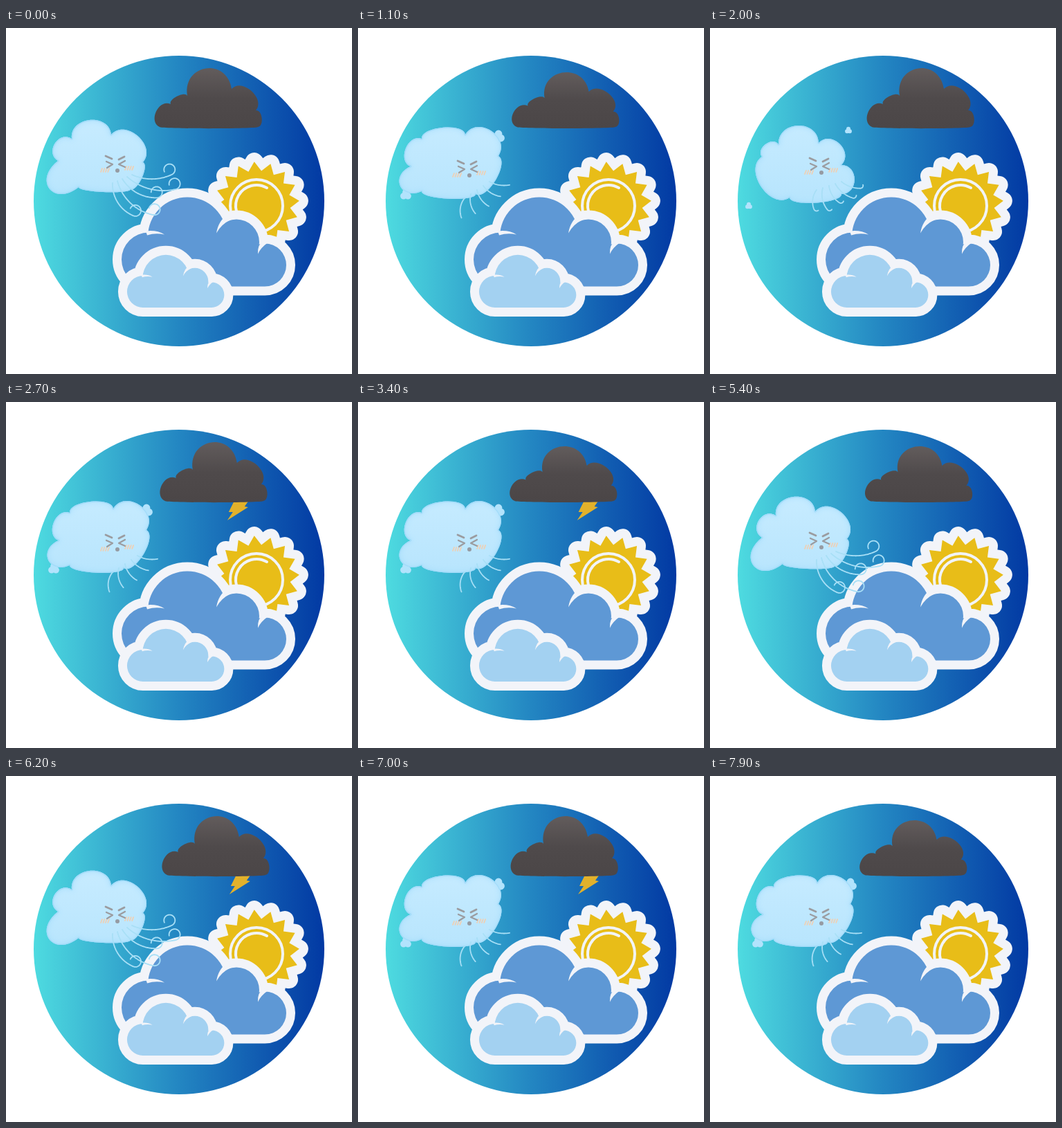
Write an HTML page with a canvas that moves like this. It is 500 by 500 pixels and loops after 8000 ms.

```html
<!DOCTYPE html>
<html lang="en">
<head>
<meta charset="utf-8">
<title>Weather</title>
<style>
html, body { margin: 0; width: 100%; height: 100%; overflow: hidden; background: #fff; }
canvas { display: block; width: 100vw; height: 100vh; }
</style>
</head>
<body>
<canvas id="stage" width="500" height="500"></canvas>
<script>
const ctx = document.getElementById('stage').getContext('2d');
const LOOP = 8000, STEP = 100, RAD = Math.PI / 180;
const WHITE = '#f2f4f9', YELLOW = '#e8bd18';

function circles(...list) {
  const path = new Path2D();
  for (const [x, y, r] of list) {
    path.moveTo(x + r, y);
    path.arc(x, y, r, 0, 2 * Math.PI);
  }
  return path;
}

// Clockwise notches [x, y, bulge]; each lobe swells out to the next notch.
function puffy(notches) {
  const path = new Path2D();
  path.moveTo(notches[0][0], notches[0][1]);
  notches.forEach(([x, y, bulge], i) => {
    const [u, v] = notches[(i + 1) % notches.length];
    const nx = (v - y) * bulge, ny = (x - u) * bulge;
    path.bezierCurveTo(x + nx, y + ny, u + nx, v + ny, u, v);
  });
  path.closePath();
  return path;
}

function fade(x0, y0, x1, y1, ...colors) {
  const g = ctx.createLinearGradient(x0, y0, x1, y1);
  colors.forEach((c, i) => g.addColorStop(i / (colors.length - 1), c));
  return g;
}

function fill(path, color) {
  ctx.fillStyle = color;
  ctx.fill(path);
}

function stroke(path, color, width) {
  ctx.strokeStyle = color;
  ctx.lineWidth = width;
  ctx.stroke(path);
}

function drawSky() {
  ctx.fillStyle = '#fff';
  ctx.fillRect(0, 0, 500, 500);
  fill(circles([250, 250, 210]), fade(40, 0, 460, 0, '#4edbe0', '#2386c2', '#0239a3'));
}

function drawSun(x, y) {
  const spikes = 16, star = new Path2D();
  for (let i = 0; i < spikes * 2; i++) {
    const a = (-94 + i * 180 / spikes) * RAD;
    const r = i % 2 ? 48 : 61;
    star.lineTo(x + r * Math.cos(a), y + r * Math.sin(a));
  }
  star.closePath();
  stroke(star, WHITE, 26);
  fill(star, YELLOW);
  stroke(circles([x - 1, y + 3, 38]), WHITE, 4);
  const glint = new Path2D();
  glint.arc(x - 1, y + 3, 30, 165 * RAD, 300 * RAD);
  stroke(glint, WHITE, 4);
}

function stickerCloud(x, y, scale, color) {
  ctx.save();
  ctx.translate(x, y);
  ctx.scale(scale, scale);
  const shape = circles([0, 0, 57], [-56, 33, 39], [71, 8, 33], [112, 41, 31]);
  shape.rect(-56, 30, 168, 42);
  stroke(shape, WHITE, 26 / scale);
  fill(shape, color);
  fill(new Path2D('M-60-8Q-44-10-33-3Q-46-6-58-2Z' +
    'M60-33Q45-24 42-5Q49-18 62-24Z' +
    'M110 5Q101 12 102 25Q106 16 116 9Z'), WHITE);
  ctx.restore();
}

function drawSticker() {
  drawSun(363, 254);
  stickerCloud(262, 301.5, 1, '#5e98d5');
  stickerCloud(231, 361.5, 0.59, '#a3d1f1');
}

const STORM = puffy([
  [222, 143, 0.52], [238, 110, 0.3], [262, 98, 0.72],
  [326, 88, 0.48], [361, 119, 0.4], [364, 143, 0.02]
]);
const BOLT = new Path2D('M323 141L344 141L337 151L342 152L312 171L320 159L314 159Z');

function drawStorm(t) {
  const p = t % 4000, beat = t % 250;
  const squat = beat >= 75 && beat < 200;
  ctx.save();
  ctx.translate(12 * (1 - Math.abs(p - 2000) / 2000) + (squat ? 1 : 0), 0);
  if (p > 2050 && p < 3550) fill(BOLT, '#e2b12b');
  if (squat) {
    ctx.translate(0, 144);
    ctx.scale(1, 0.93);
    ctx.translate(0, -144);
  }
  fill(STORM, fade(0, 58, 0, 145, '#625c5c', '#4f4a4b', '#4b4647'));
  ctx.restore();
}

// Five strands fan out from the mouth, bend upward and end in a curl.
function gust({ x, y, dx, dy, angle, fan, bend, len, wave, curl, radius }) {
  const path = new Path2D();
  for (let k = 0; k < 5; k++) {
    const size = len + wave * (k % 2);
    const tail = curl * RAD * radius;
    let px = x + dx * k, py = y + dy * k, a = (angle + fan * k) * RAD;
    path.moveTo(px, py);
    for (let s = 0; s < size + tail; s++) {
      a -= s < size ? (bend + 5 * k) * RAD / size : 1 / radius;
      px += Math.cos(a);
      py += Math.sin(a);
      path.lineTo(px, py);
    }
  }
  return path;
}

const BLOW = [
  {
    cloud: puffy([[75, 192, 0.6], [95, 160, 0.56], [152, 154, 0.52],
                  [198, 194, 0.25], [180, 233, 0.1], [105, 230, 0.95]]),
    mouth: 206,
    wind: gust({ x: 182, y: 212, dx: -7, dy: 3, angle: 25, fan: 17, bend: 50,
                 len: 60, wave: 16, curl: 260, radius: 8 })
  },
  {
    cloud: puffy([[76, 200, 0.5], [92, 160, 0.28], [155, 154, 0.58],
                  [203, 185, 0.3], [170, 240, 0.15], [92, 236, 0.85]]),
    mouth: 213,
    puffs: [[203, 157, 9], [69, 241, 8]],
    wind: gust({ x: 190, y: 222, dx: -9, dy: 6, angle: 30, fan: 25, bend: 40,
                 len: 30, wave: 0, curl: 0, radius: 1 })
  },
  {
    cloud: puffy([[75, 186, 0.5], [99, 168, 0.6], [157, 166, 0.58],
                  [190, 198, 0.6], [190, 240, 0.18], [115, 245, 0.47]]),
    mouth: 209,
    puffs: [[200, 148, 5], [56, 257, 5]],
    wind: gust({ x: 190, y: 222, dx: -9, dy: 3, angle: 40, fan: 22, bend: 40,
                 len: 30, wave: 4, curl: 100, radius: 4 })
  }
];

function softCloud(path) {
  ctx.save();
  fill(path, fade(0, 140, 0, 245, '#c6ebff', '#b8e5fd'));
  ctx.clip(path);
  ctx.shadowColor = '#a4dcfa';
  ctx.shadowBlur = 7;
  stroke(path, '#a4dcfa', 3);
  ctx.restore();
}

function drawPuff([x, y, r]) {
  const ring = [-90, 30, 150].map(a =>
    [x + r * 0.45 * Math.cos(a * RAD), y + r * 0.45 * Math.sin(a * RAD), r * 0.6]);
  fill(circles(...ring), '#b2e3fc');
}

function drawFace(x, y) {
  ctx.save();
  ctx.translate(x, y);
  const cheeks = new Path2D();
  for (let i = 0; i < 4; i++) {
    for (const [cx, cy] of [[-24, 2], [11, -1]]) {
      cheeks.moveTo(cx + i * 3.4, cy);
      cheeks.lineTo(cx + i * 3.4 + 2, cy - 5);
    }
  }
  stroke(cheeks, '#efd0b4', 1.8);
  stroke(new Path2D('M-17-21l9 4M2-16l8-4'), '#9b9ca0', 2.8);
  stroke(new Path2D('M-16-13l9 4l-8 5M11-14l-9 5l9 4'), '#9b9ca0', 2.2);
  fill(circles([0, 0, 3]), '#969ba3');
  ctx.restore();
}

function drawBlower(t) {
  const p = t % 750, i = Math.floor(p / 250);
  const { cloud, puffs = [], mouth, wind } = BLOW[i];
  ctx.save();
  if (i === 0) ctx.translate(0, 4 * Math.min(1, p / 150));
  puffs.forEach(drawPuff);
  softCloud(cloud);
  stroke(wind, '#a8dff6', 1.8);
  drawFace(161, mouth);
  ctx.restore();
}

function draw(t) {
  drawSky();
  drawStorm(t);
  drawSticker();
  drawBlower(t);
}

ctx.lineCap = ctx.lineJoin = 'round';
const start = performance.now();
function tick() {
  const t = (performance.now() - start) % LOOP;
  draw(Math.floor(t / STEP) * STEP);
  requestAnimationFrame(tick);
}
tick();
</script>
</body>
</html>
```
